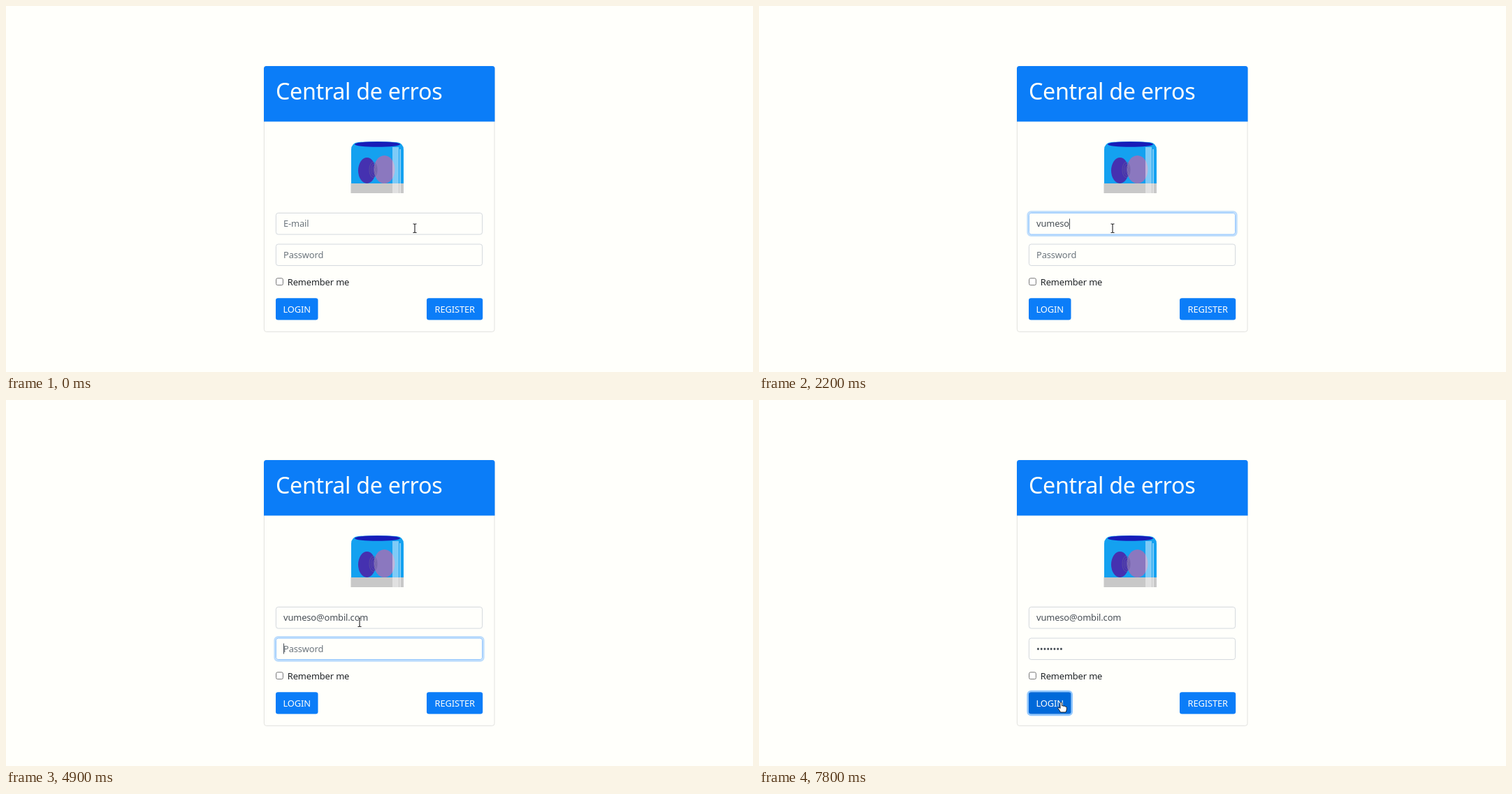
Write an HTML page that moves like this. It is 1069 px wide and 524 px high and loops after 8 s.

```html
<!DOCTYPE html>
<html lang="pt">
<head>
<meta charset="utf-8">
<title>Central de erros</title>
<style>
  html, body { margin: 0; width: 100%; height: 100%; overflow: hidden; background: #fffffb; }
  svg { display: block; width: 100%; height: 100%; }
  text { font: 12.9px "Noto Sans", "Open Sans", sans-serif; letter-spacing: -.01em; fill: #495057; white-space: pre; }
  .title { font-size: 32.3px; font-weight: 500; fill: #fffffb; }
  .button { fill: #fffffb; text-anchor: middle; }
  .field rect { fill: #fffffb; stroke: #ced4da; stroke-width: .9; }
  .field .ring { fill: none; stroke: #007bff; stroke-opacity: .25; stroke-width: 2.7; }
  .field.focus .box { stroke: #80bdff; }
  .field.empty text { fill: #6c757d; }
  .field:not(.focus) .ring { display: none; }
</style>
</head>
<body>
<svg viewBox="0 0 1069 524">
  <rect x="369.4" y="86.4" width="329.6" height="380" rx="3.3" fill="none" stroke="#dfdfdc" stroke-width=".9"/>
  <path d="M369 165.5V89.5Q369 86 372.5 86H696Q699.5 86 699.5 89.5V165.5Z" fill="#0b7df8"/>
  <text class="title" x="386" y="134">Central de erros</text>

  <g id="siren">
    <path id="glass" d="M494 255V206Q494 196 504 195Q531 193 559 195Q569 196 569 206V255Z"/>
    <ellipse id="rim" cx="531.5" cy="198" rx="32.5" ry="3.8"/>
    <ellipse cx="516.5" cy="235.5" rx="12.5" ry="18.5" fill="#4531b0"/>
    <ellipse cx="541.5" cy="234" rx="15" ry="20" fill="#8b78bf"/>
    <g fill="none" stroke="#665a9c" stroke-width=".7">
      <ellipse cx="525.5" cy="234.5" rx="5.5" ry="11"/>
      <ellipse cx="526" cy="234.5" rx="3.5" ry="8"/>
      <ellipse cx="526.5" cy="234.5" rx="1.7" ry="5"/>
    </g>
    <path d="M493.5 254H569V268H493.5Z" fill="#c8c8c8"/>
    <path d="M553 202H562V268H553ZM563 205H565V268H563Z" fill="#fff" fill-opacity=".45"/>
  </g>

  <g class="field" id="email">
    <rect class="ring" x="384.7" y="294.7" width="298.6" height="34" rx="4.6"/>
    <rect class="box" x="386.4" y="296.4" width="295.2" height="30.6" rx="3.3"/>
    <text x="397" y="316.4"></text>
  </g>
  <g class="field" id="password">
    <rect class="ring" x="384.7" y="339.3" width="298.6" height="34" rx="4.6"/>
    <rect class="box" x="386.4" y="341" width="295.2" height="30.6" rx="3.3"/>
    <text x="397" y="361"></text>
  </g>
  <rect id="caret" width="1" height="15" fill="#495057"/>

  <rect x="386.6" y="389.8" width="9.8" height="9.8" rx="2" fill="#fff" stroke="#767676"/>
  <text x="402.8" y="399.8" style="fill:#212529">Remember me</text>
  <rect id="loginRing" x="384.7" y="417" width="63" height="33.8" rx="4.6" fill="none" stroke="#268fff" stroke-opacity=".5" stroke-width="2.7"/>
  <rect id="login" x="386" y="418.3" width="60.5" height="31.2" rx="3.3"/>
  <text class="button" x="416.2" y="438.6">LOGIN</text>
  <rect x="602" y="418.3" width="80.2" height="31.2" rx="3.3" fill="#0b7df8"/>
  <text class="button" x="642.2" y="438.6">REGISTER</text>

  <g id="cursor" stroke-linejoin="round">
    <g id="beam" fill="none">
      <path d="M-2.5-6H-.8L0-5 .8-6H2.5M0-5V5.5M-2.5 6.5H-.8L0 5.5.8 6.5H2.5" stroke="#fff" stroke-width="2.6"/>
      <path d="M-2.5-6H-.8L0-5 .8-6H2.5M0-5V5.5M-2.5 6.5H-.8L0 5.5.8 6.5H2.5" stroke="#222" stroke-width="1.1"/>
    </g>
    <path id="arrow" d="M0-6V7L3 4.4 5 9 7 8.1 5 3.7H9Z" fill="#111" stroke="#fff" stroke-width=".9"/>
    <path id="hand" d="M-2-6.5Q-.5-8 .6-6.5V-2Q2-3 3-1.6 4.5-2.4 5.4-1 7-1.4 7.3.4V3Q7 5 6 7H-1.5Q-3 4-5 1.7-5 0-3.5.2L-2 1.5Z" fill="#fff" stroke="#111" stroke-width=".9"/>
  </g>
</svg>
<script>
const LOOP = 8000, STEP = 100;
const $ = id => document.getElementById(id);
const clamp = v => Math.min(1, Math.max(0, v));
const smooth = v => { v = clamp(v); return v * v * (3 - 2 * v); };
const mix = (a, b, k) => `rgb(${a.map((v, i) => Math.round(v + (b[i] - v) * k))})`;
const show = (id, on) => $(id).style.display = on ? "" : "none";

const fields = [
  { id: "email", hint: "E-mail", value: "vumeso@ombil.com", from: 700, to: 4800, caretY: 304.5,
    keys: [1300, 1400, 1600, 1800, 1900, 2100, 2600, 3000, 3300, 3600, 3700, 3900, 4100, 4400, 4500, 4600] },
  { id: "password", hint: "Password", value: "•".repeat(8), from: 4800, to: 7700, caretY: 348.5,
    keys: [5600, 5800, 6000, 6200, 6400, 6500, 6500, 6600] }
];

function drawField({ id, hint, value, from, to, caretY, keys }, t) {
  const count = keys.filter(k => k <= t).length;
  const focused = t >= from && t < to;
  const group = $(id), text = group.querySelector("text");
  group.classList.toggle("focus", focused);
  group.classList.toggle("empty", !count);
  text.textContent = count ? value.slice(0, count) : hint;
  if (!focused) return;
  const lastInput = count ? keys[count - 1] : from;
  const x = 397 + (count ? text.getComputedTextLength() : 0);
  $("caret").setAttribute("x", Math.floor(x));
  $("caret").setAttribute("y", caretY);
  show("caret", (t - lastInput) % 1000 < 500);
}

function drawSiren(t) {
  const phase = t % 1120;
  const dark = smooth((190 - Math.abs(phase - 775)) / 120);
  $("glass").setAttribute("fill", mix([20, 161, 240], [3, 18, 229], dark));
  $("rim").setAttribute("fill", mix([24, 28, 184], [12, 24, 206], dark));
}

function drawCursor(t) {
  const first = smooth(t / 600), second = smooth((t - 6800) / 700);
  const x = 585 - 79 * first - 73 * second;
  const y = 318 + 122 * second;
  const onLogin = x < 446.5 && y > 418;
  const onField = y < 327 || (y > 341 && y < 372);
  $("cursor").setAttribute("transform", `translate(${x} ${y})`);
  show("beam", onField);
  show("hand", onLogin);
  show("arrow", !onField && !onLogin);
  $("login").setAttribute("fill", onLogin ? "#0069d9" : "#0b7df8");
  show("loginRing", t >= 7700);
}

function draw(now) {
  const t = Math.floor(now % LOOP / STEP) * STEP;
  show("caret", false);
  fields.forEach(field => drawField(field, t));
  drawSiren(t);
  drawCursor(t);
  requestAnimationFrame(draw);
}
draw(0);
</script>
</body>
</html>
```
